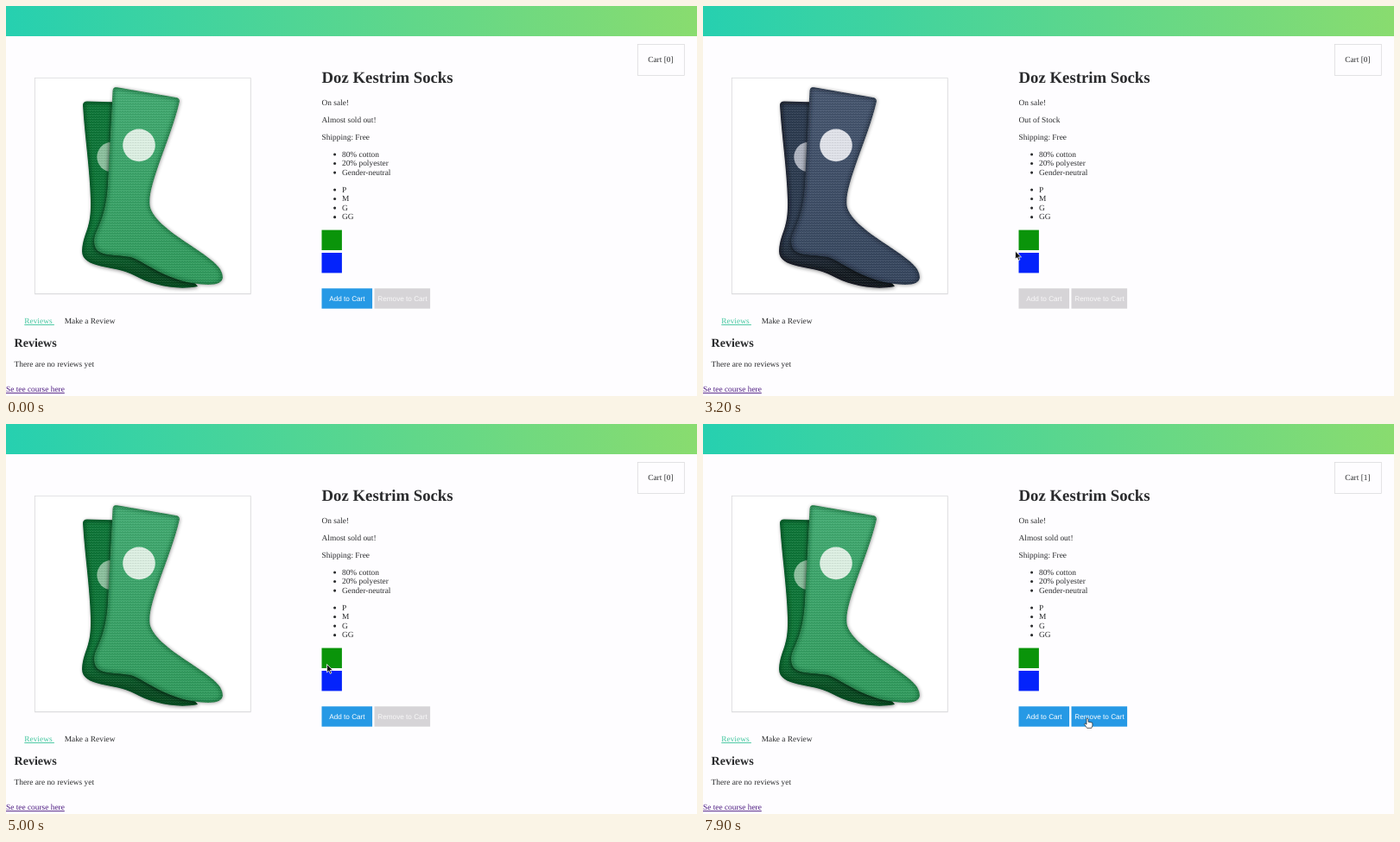
These frames come from a looping animation (800x452 px, 8 s). An HTML page:

```html
<!DOCTYPE html>
<html lang="en">
<head>
<meta charset="utf-8">
<title>Sock shop</title>
<style>
html, body { margin: 0; width: 100%; height: 100%; overflow: hidden; background: #fefdff; }
svg { display: block; width: 100vw; height: 100vh; }
text { font: 9.37px "Liberation Serif", "Times New Roman", serif; fill: #2a2b2d; white-space: pre; text-rendering: geometricPrecision; }
.h1 { font-size: 18.74px; font-weight: bold; }
.h2 { font-size: 14.06px; font-weight: bold; }
.btn { font: 8.2px "Liberation Sans", Arial, sans-serif; fill: #fff; text-anchor: middle; }
.on { fill: #2699e5; }
.off { fill: #d6d4d7; }
.off + .btn { fill: #f8f7f8; }
.tab { fill: #45c7a0; text-decoration: underline; }
.link { fill: #4c1a80; text-decoration: underline; }
#stage { --top: #42ab72; --foot: #2f9a5c; --back: #0b7335; --sole: #06481f; --edge: #0b5a2c; --badge: #dcefe2; --dim: #8abf9c; }
#stage.blue { --top: #46566f; --foot: #35455d; --back: #2a394e; --sole: #12191f; --edge: #141d2a; --badge: #e0e2e9; --dim: #adb3c0; }
</style>
</head>
<body>
<svg id="stage" viewBox="0 0 800 452" preserveAspectRatio="none">
  <defs>
    <linearGradient id="bar"><stop stop-color="#26d0b0"/><stop offset="1" stop-color="#89dc6f"/></linearGradient>
    <linearGradient id="frontFill" x1="0" y1="0" x2="0.25" y2="1">
      <stop style="stop-color:var(--top)"/><stop offset="1" style="stop-color:var(--foot)"/>
    </linearGradient>
    <linearGradient id="backFill" x1="0" y1="0" x2="0" y2="1">
      <stop offset=".72" style="stop-color:var(--back)"/><stop offset=".92" style="stop-color:var(--sole)"/>
    </linearGradient>
    <pattern id="knit" width="3" height="3" patternUnits="userSpaceOnUse">
      <path d="M0 .4L1.5 1.9L3 .4" fill="none" stroke="#fff" stroke-width=".6" opacity=".2"/>
      <path d="M0 1.9L1.5 3.4L3 1.9" fill="none" stroke="#000" stroke-width=".5" opacity=".16"/>
    </pattern>
    <path id="front" d="M123.5 98Q124 93.4 129 94.2L197 106Q202 107 200.6 112C190 157 160 215 167.5 235C178 262 236 286 248 305Q258 323 234 323C188 322 163 297 144 291C122 287 101 292 102 271C103 258 116 249 118 203Z"/>
    <path id="back" d="M89 115Q89 110.3 94 110.4L150 112V230L200 300L222 325C196 330 168 323 148 312C126 300 88 305 88 284C89 262 99 260 98 225C97 188 91 150 89 115Z"/>
    <clipPath id="inFront"><use href="#front"/></clipPath>
    <clipPath id="inBack"><use href="#back"/></clipPath>
    <filter id="soft" x="-20%" y="-20%" width="140%" height="140%"><feGaussianBlur stdDeviation="2.2"/></filter>
  </defs>

  <rect width="800" height="35" fill="url(#bar)"/>

  <rect x="33" y="84.3" width="250.6" height="250" fill="#c9c8ca" opacity=".55"/>
  <rect x="33.3" y="83.3" width="249.9" height="250" fill="#fff" stroke="#d8d7d9" stroke-width=".7"/>

  <use href="#back" filter="url(#soft)" opacity=".45" transform="translate(1 1.2)"/>
  <use href="#front" filter="url(#soft)" opacity=".4" transform="translate(.5 .5)"/>
  <g clip-path="url(#inBack)">
    <use href="#back" fill="url(#backFill)"/>
    <circle cx="122.5" cy="175" r="17.2" style="fill:var(--dim)"/>
    <use href="#back" fill="url(#knit)"/>
    <use href="#back" fill="none" style="stroke:var(--sole)" stroke-width="4" filter="url(#soft)"/>
    <use href="#front" opacity=".5" filter="url(#soft)" transform="translate(-1 1)"/>
  </g>
  <g clip-path="url(#inFront)">
    <use href="#front" fill="url(#frontFill)"/>
    <use href="#front" fill="none" style="stroke:var(--edge)" stroke-width="4" opacity=".7" filter="url(#soft)"/>
    <circle cx="154" cy="161.4" r="18.8" style="fill:var(--badge)"/>
    <use href="#front" fill="url(#knit)"/>
  </g>

  <g id="copy"></g>

  <rect x="731.3" y="44.4" width="54" height="36" fill="none" stroke="#d8d7d9" stroke-width=".7"/>
  <text id="cart" x="743.2" y="65.3"></text>

  <rect x="365.5" y="259.6" width="23.4" height="23.4" fill="#0a940a"/>
  <rect x="365.5" y="286" width="23.4" height="23.4" fill="#0423fb"/>

  <rect id="add" x="365.5" y="327.3" width="58.6" height="23.4"/>
  <text class="btn" x="394.9" y="341.9">Add to Cart</text>
  <rect id="remove" x="426.5" y="327.3" width="64.6" height="23.4"/>
  <text class="btn" x="459" y="341.9">Remove to Cart</text>

  <path id="arrow" d="M0 0V9.4L2.2 7.5L3.8 10.9L5.4 10.1L3.9 6.9H7Z" fill="#111" stroke="#fff" stroke-width=".8" stroke-linejoin="round"/>
  <path id="hand" d="M-1 .6Q0 -.6 1 .6V4.2L4.5 4.9Q5.9 4.8 5.9 6V8.4L4.9 11.4H-.4L-3.3 7.3Q-3.6 5.8 -2.2 6.2L-1 7.2Z" fill="#fff" stroke="#222" stroke-width=".7" stroke-linejoin="round"/>
</svg>
<script>
const LOOP = 8000, STEP = 100, LINE = 10.55, PARAGRAPH = 19.9;
const $ = id => document.getElementById(id);

function put(tag, attrs, text = "") {
  const el = document.createElementNS("http://www.w3.org/2000/svg", tag);
  for (const key in attrs) el.setAttribute(key, attrs[key]);
  el.textContent = text;
  $("copy").append(el);
  return el;
}
const write = (x, y, text, cls = "") => put("text", { x, y, class: cls }, text);

// Product copy flows down from one baseline to the next
let base = 115;
function paragraph(text) {
  const el = write(365.6, base, text);
  base += PARAGRAPH;
  return el;
}
function list(...items) {
  for (const item of items) {
    put("circle", { cx: 380.6, cy: base - 2.7, r: 1.55, fill: "#2a2b2d" });
    write(389, base, item);
    base += LINE;
  }
  base += PARAGRAPH - LINE;
}

write(365.6, 89, "Doz Kestrim Socks", "h1");
paragraph("On sale!");
const stock = paragraph("");
paragraph("Shipping: Free");
list("80% cotton", "20% polyester", "Gender-neutral");
list("P", "M", "G", "GG");
write(21.3, 368, "Reviews ", "tab");
write(67.7, 368, "Make a Review");
write(9.5, 394.6, "Reviews", "h2");
write(9.5, 417.8, "There are no reviews yet");
write(0, 447.2, "Se tee course here", "link");

// Pointer stops: arrival time and place; a repeated place is a rest
const SOCK = [76, 179], GREEN = [371, 272], BLUE = [373, 297], ADD = [382, 338.5], REMOVE = [445, 341];
const stops = [
  [200, 757, 58], [700, 22, 405], [900, ...SOCK], [1100, ...SOCK],
  [1200, 160, 248], [1700, 340, 338], [2000, ...BLUE], [2600, ...BLUE],
  [2900, ...GREEN], [3100, ...BLUE], [3200, 361.5, 284], [3400, ...BLUE], [3900, ...BLUE],
  [4200, ...GREEN], [4400, 361.5, 289], [4500, ...BLUE], [4800, ...BLUE],
  [5100, ...GREEN], [5400, 350.5, 278], [5700, 367, 318],
  [5900, ...ADD], [7000, ...ADD], [7400, ...REMOVE], [LOOP, ...REMOVE]
];
const adds = [6000, 6300, 6600], removes = [7500, 7800];

function pointer(t) {
  const i = stops.findIndex(stop => stop[0] > t);
  const [t0, x0, y0] = stops[i - 1], [t1, x1, y1] = stops[i];
  const k = (t - t0) / (t1 - t0), ease = k * k * (3 - 2 * k);
  return [x0 + (x1 - x0) * ease, y0 + (y1 - y0) * ease];
}

// The last swatch the pointer touched decides the colour
function isBlueAt(t) {
  for (; t >= stops[0][0]; t -= STEP) {
    const [x, y] = pointer(t);
    if (x < 365.5 || x > 389) continue;
    if (y > 286 && y < 309.4) return true;
    if (y > 259.6 && y < 283) return false;
  }
  return false;
}

const past = (clicks, t) => clicks.filter(c => c <= t).length;

function draw(t) {
  const blue = isBlueAt(t), count = past(adds, t) - past(removes, t);
  $("stage").setAttribute("class", blue ? "blue" : "");
  stock.textContent = blue ? "Out of Stock" : "Almost sold out!";
  $("cart").textContent = `Cart [${count}]`;
  $("add").setAttribute("class", blue || count === adds.length ? "off" : "on");
  $("remove").setAttribute("class", count ? "on" : "off");

  const shown = t >= stops[0][0], [x, y] = shown ? pointer(t) : [0, 0];
  const onButton = y > 327 && x > 365;
  $("arrow").style.display = shown && !onButton ? "" : "none";
  $("hand").style.display = shown && onButton ? "" : "none";
  for (const id of ["arrow", "hand"]) $(id).setAttribute("transform", `translate(${x} ${y})`);
}

const start = performance.now();
function tick() {
  const t = (performance.now() - start) % LOOP;
  draw(Math.floor(t / STEP) * STEP);
  requestAnimationFrame(tick);
}
tick();
</script>
</body>
</html>
```
